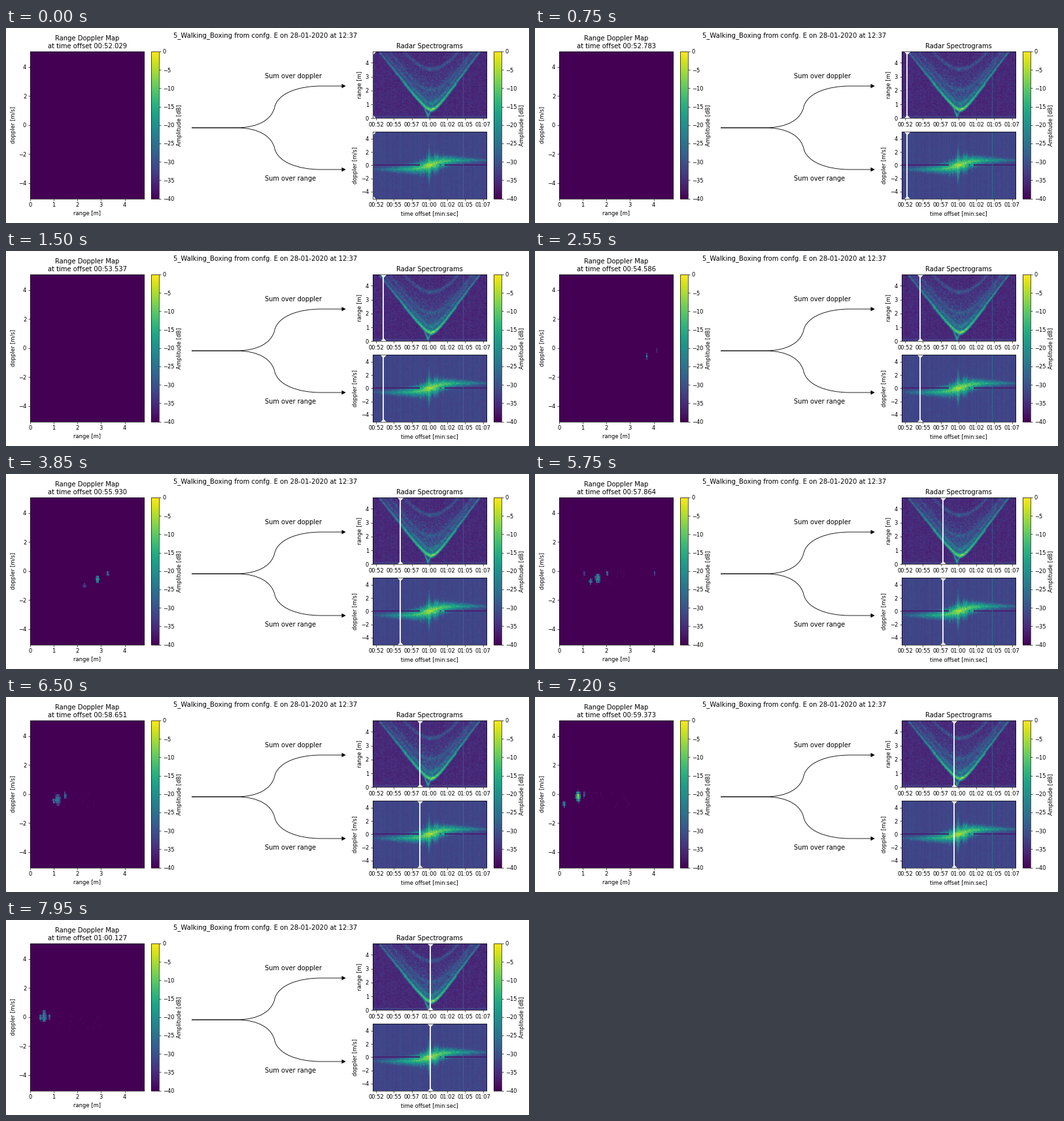
Write a matplotlib script that moves like this. It is 800x299 px and loops after 8 s.

```python
import numpy as np
import matplotlib.pyplot as plt
from matplotlib.animation import FuncAnimation
from matplotlib.cm import ScalarMappable
from matplotlib.colors import Normalize
from matplotlib.patches import PathPatch, Polygon
from matplotlib.path import Path

W, H, DPI = 800, 299, 72          # at 72 dpi one point is one pixel
FRAMES, INTERVAL = 160, 50
T0, T1, STEP = 52.0294, 67.99, 0.032784
R_MAX, V_MAX, DB_MIN = 4.82, 5.06, -40
PASS = 60.2                       # moment of closest approach

EM = 10 / 12                      # default sizes at 60 dpi, in pixels
plt.rcParams.update({
    "font.family": "DejaVu Sans", "font.size": 10 * EM,
    "axes.titlesize": 12 * EM, "axes.titlepad": 6 * EM,
    "axes.labelpad": 4 * EM, "axes.linewidth": 0.8 * EM,
})
for axis in "xy":
    plt.rcParams.update({f"{axis}tick.major.size": 3.5 * EM,
                         f"{axis}tick.major.pad": 3.5 * EM,
                         f"{axis}tick.major.width": 0.8 * EM})
fig = plt.figure(figsize=(W / DPI, H / DPI), dpi=DPI, facecolor="white")
norm = Normalize(DB_MIN, 0)

# default vertical margins, right column split with a gap of 0.2
TOP, BOTTOM = 0.12 * H, 0.875 * H
ROW = (BOTTOM - TOP) / 2.2


def panel(x0, y0, width, height):
    """Axes from a pixel box measured from the top left."""
    return fig.add_axes([x0 / W, 1 - (y0 + height) / H, width / W, height / H])


def heat(ax, data, extent):
    return ax.imshow(data, extent=extent, origin="lower", aspect="auto",
                     cmap="viridis", norm=norm, interpolation="nearest")


def amplitude_bar(x):
    bar = fig.colorbar(ScalarMappable(norm, "viridis"),
                       cax=panel(x, TOP, 11.6, BOTTOM - TOP),
                       ticks=range(DB_MIN, 1, 5))
    bar.set_label("Amplitude [dB]")


# ---- walk: distance and speed of the body ----
def distance(t):
    dt = t - PASS
    return np.hypot(0.6, np.where(dt < 0, 0.65, 0.70) * dt)


def speed(t):
    return 0.08 + 0.66 * np.tanh(0.5 * (t - PASS))


def swing(t):
    return np.cos(2 * np.pi * (t - 59.4) / 1.2)


# ---- spectrograms ----
rng = np.random.default_rng(12)
COLS, ROWS = 175, 102
t = np.linspace(T0, T1, COLS)[None, :]
r = np.linspace(0, R_MAX, ROWS)[:, None]
v = np.linspace(-V_MAX, V_MAX, ROWS)[:, None]
far = np.abs(t - PASS)


def noise(sd):
    return rng.normal(0, sd, (ROWS, COLS))


def soften(db):
    for axis in (0, 1):
        near = np.roll(db, 1, axis) + np.roll(db, -1, axis)
        db = 0.7 * db + 0.15 * near
    return db


def with_glitch(db, level):
    col = np.argmin(np.abs(t - 64.65))
    db[:, col] = np.maximum(db[:, col], level)
    return db


def range_spectrogram():
    path = distance(t)
    leg = np.abs(t - 59.75)
    db = -35.4 + noise(1.2) + rng.normal(0, 0.3, (1, COLS))
    haze = -27.5 - 0.9 * far - 3 * (r - path) + noise(3)
    db = np.maximum(db, np.where(r > path, haze, DB_MIN))
    ridges = [(path, 0.10, -8 - 2.6 * far),
              (path + 0.4, 0.18, -23 - 1.5 * far),
              (np.hypot(2.0, 0.75 * far), 0.18, -29 - 0.5 * far),
              (np.hypot(3.5, 0.85 * far), 0.18, -29.5 - 0.5 * far),
              (0.1 + 1.2 * leg, 0.12, -17 - 9 * leg)]
    for center, width, peak in ridges:
        echo = peak + noise(3.5) - 6 * ((r - center) / width) ** 2
        db = np.maximum(db, echo)
    db[1:3] = np.maximum(db[1:3], -32)
    return with_glitch(soften(db), -30)


def doppler_spectrogram():
    db = -31.7 + noise(0.5) + rng.normal(0, 0.4, (1, COLS))
    burst = rng.random((1, COLS)) ** 3 * np.exp(-((t - 60.3) / 2) ** 2)
    width = 0.42 + 0.45 * burst + 0.4 * np.exp(-((t - 59.85) / 0.12) ** 2)
    echo = -5 - 2.9 * far + noise(2.5) - 9 * np.abs(v - speed(t)) / width
    db = soften(np.maximum(db, echo))
    dc = np.argmin(np.abs(v - 0.1))
    db[dc] = np.where(db[dc] > -20, db[dc], -36.5)
    return with_glitch(db, -26)


# ---- range-doppler map ----
NR, NV, FLOOR = 100, 64, -36
cell_r = ((np.arange(NR) + 0.5) / NR * R_MAX)[None, :]
cell_v = (((np.arange(NV) + 0.5) / NV * 2 - 1) * V_MAX)[:, None]


def echoes(now):
    """Yield range, doppler, half width, half height, peak of each echo."""
    age = now - 54.4
    if age < 0:
        return
    body, vel, gait = float(distance(now)), speed(now), swing(now)
    level = -34 + 8 * np.sqrt(age)
    reach = 0.35 + 0.25 * gait
    yield (body, vel, min(0.12, 0.035 + 0.03 * age),
           min(0.4, 0.17 + 0.06 * age), level + 9 * gait)
    yield body - reach, vel - 0.8 * reach, 0.06, 0.22, level - 6
    yield (body + min(0.43, 0.1 + 0.18 * body), vel / 4, 0.05, 0.2,
           min(level - 1, -25))
    for ghost in (1.07, 4.03):
        yield ghost, -0.18, 0.04, 0.2, -26 - 40 * abs(gait)


def doppler_map(step, now):
    rnd = np.random.default_rng(step)
    speckle = rnd.normal(0, 2.5, (NV, NR))
    db = np.full((NV, NR), float(DB_MIN))
    if now > 57:
        haze = (rnd.random((NV, NR)) < 0.12) & (np.abs(cell_v + 0.4) < 0.6)
        db[haze & (np.abs(cell_r - 1.9) < 1.1)] = -39.5
    for center, vel, w, h, peak in echoes(now):
        if peak > FLOOR:
            d2 = ((cell_r - center) / w) ** 2 + ((cell_v - vel) / h) ** 2
            echo = peak - (peak - FLOOR) * d2 + speckle * (d2 < 1.2)
            db = np.maximum(db, np.where(echo > FLOOR, echo, DB_MIN))
    return db


# ---- layout ----
ax_map = panel(37, TOP, 174.2, BOTTOM - TOP)
map_img = heat(ax_map, np.full((NV, NR), DB_MIN), [0, R_MAX, -V_MAX, V_MAX])
ax_map.set(xlabel="range [m]", ylabel="doppler [m/s]",
           xticks=range(5), yticks=range(-4, 5, 2))
amplitude_bar(222.3)

ax_range = panel(560.8, TOP, 174.2, ROW)
heat(ax_range, range_spectrogram(), [T0, T1, 0, R_MAX])
ax_range.set(ylabel="range [m]", title="Radar Spectrograms", yticks=range(5))

ax_dop = panel(560.8, BOTTOM - ROW, 174.2, ROW)
heat(ax_dop, doppler_spectrogram(), [T0, T1, -V_MAX, V_MAX])
ax_dop.set(xlabel="time offset [min:sec]", ylabel="doppler [m/s]",
           yticks=range(-4, 5, 2))
amplitude_bar(746.3)

cursors = []
ticks = np.arange(52.5, 68, 2.5)
for ax, low, high in ((ax_range, 0, R_MAX), (ax_dop, -V_MAX, V_MAX)):
    ax.set_xticks(ticks, [f"{int(s) // 60:02d}:{int(s) % 60:02d}" for s in ticks])
    cursors += ax.plot([T0, T0], [low, high], color="white", lw=1.8,
                       marker="D", ms=5)
    ax.set(xlim=(T0, T1), ylim=(low, high))

stage = panel(0, 0, W, H)
stage.set(xlim=(0, W), ylim=(H, 0))
stage.axis("off")
stage.text(396.4, 0.02 * H, "5_Walking_Boxing from confg. E on 28-01-2020 at 12:37",
           size=10, ha="center", va="top")
stage.text(395.5, 77, "Sum over doppler", size=9.8)
stage.text(395.5, 234, "Sum over range", size=9.8)

MID, RISE = 153, 64
for side in (-1, 1):
    curve = [(284, 0), (352, 0), (388, 0), (407, 14), (411, RISE / 2),
             (416, 52), (445, RISE), (482, RISE), (514, RISE)]
    points = [(x, MID + side * y) for x, y in curve]
    codes = [Path.MOVETO, Path.LINETO] + [Path.CURVE4] * 6 + [Path.LINETO]
    stage.add_patch(PathPatch(Path(points, codes), fill=False, lw=0.85))
    tip = MID + side * RISE
    stage.add_patch(Polygon([(513.5, tip - 3.3), (519.8, tip), (513.5, tip + 3.3)],
                            color="black", lw=0))

# radar steps run slightly unevenly against the clock
CLOCK = [0, 30, 51, 77, 115, 144, 159]
STEPS = [0, 46, 78, 119, 178, 224, 247]


def show(frame):
    step = int(round(np.interp(frame, CLOCK, STEPS)))
    now = T0 + step * STEP
    ms = int(now * 1000)
    ax_map.set_title("Range Doppler Map\nat time offset "
                     f"{ms // 60000:02d}:{ms % 60000 / 1000:06.3f}")
    map_img.set_data(doppler_map(step, now))
    for line in cursors:
        line.set_xdata([now, now])
    return [map_img, *cursors]


anim = FuncAnimation(fig, show, frames=FRAMES, interval=INTERVAL,
                     init_func=lambda: show(0), repeat=True, repeat_delay=0)
plt.show()
```
